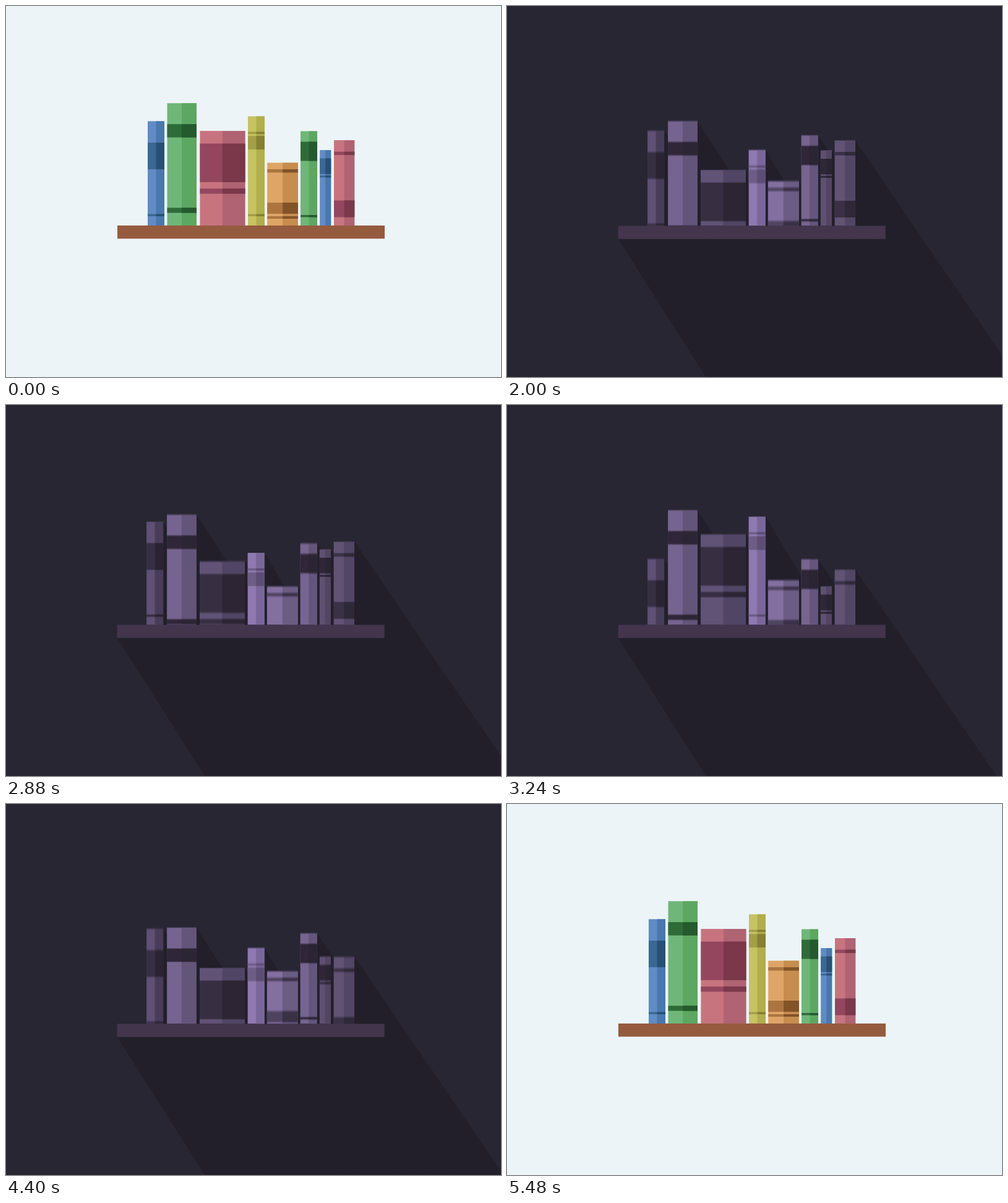
Write an HTML page with a canvas that moves like this. It is 800 px wide and 600 px high and loops after 5760 ms.

```html
<!DOCTYPE html>
<html lang="en">
<head>
<meta charset="utf-8">
<title>Bookshelf</title>
<style>
  html, body { margin: 0; height: 100%; overflow: hidden; background: #ecf4f7; }
  canvas { display: block; }
</style>
</head>
<body>
<canvas id="stage" width="800" height="600"></canvas>
<script>
const LOOP = 5760, DARK_FROM = 880, DARK_TO = 5480, STEP = 40;
const HALF = 400;            // time of one drop or one rise
const SHELF = 355;

const stage = document.getElementById('stage').getContext('2d');
const layer = document.createElement('canvas');
layer.width = 800;
layer.height = 600;
const scene = layer.getContext('2d');

// Colours: left half, right half, band on the left, band on the right
const blue = ['#608bc4', '#4a78ad', '#3a6894', '#275074'];
const green = ['#6fb778', '#5ca761', '#2f6b39', '#245a2e'];
const pink = ['#c8747f', '#b06373', '#94465f', '#7a384a'];
const yellow = ['#c5c362', '#b1ae4c', '#a39f47', '#858032'];
const orange = ['#dea566', '#c68d4e', '#ac7540', '#835328'];

const every800 = start => [0, 1, 2, 3].map(i => start + i * 2 * HALF);

const books = [
  { x: 229, w: 27, top: 186.3, bands: [[221, 264], [336.5, 340]], day: blue,
    night: ['#5f5075', '#483d59', '#362f42', '#2a2432'],
    nudge: -1.5, amp: 69.3, slope: .64, drops: every800(1320) },
  { x: 260.5, w: 47.5, top: 157.2, bands: [[191, 212.5], [326.3, 334.5]], day: green,
    night: ['#74648f', '#63557a', '#2f2738', '#2c2534'],
    amp: 44, slope: .64, drops: [1440, 2266, 3100, 3952] },
  { x: 313.4, w: 73, top: 202, bands: [[222.5, 284.8], [295.2, 303.5]], day: pink,
    night: ['#605376', '#504564', '#372f41', '#2d2533'],
    amp: 64.5, slope: .64, drops: every800(1560) },
  { x: 391, w: 27, top: 178.4, bands: [[203.5, 207], [210.2, 232], [336.5, 340]], day: yellow,
    night: ['#8e79b0', '#7a679a', '#6d5d86', '#5c4e73'],
    amp: 60.2, slope: .6, drops: every800(1680) },
  { x: 422.2, w: 49.8, top: 253.5, bands: [[264, 269.4], [318, 336], [340, 344]], day: orange,
    night: ['#836fa0', '#6b5c84', '#4f4460', '#3a3147'],
    amp: 60, slope: .64, drops: [1803, 2637, 3449, 4262] },
  { x: 476, w: 27, top: 202.5, bands: [[219.5, 250.5], [338, 341.5]], day: green,
    night: ['#76658f', '#63557b', '#2f2738', '#2b2432'],
    amp: 59.3, slope: .66, drops: every800(1920) },
  { x: 507.2, w: 18, top: 233, bands: [[246.5, 271.7], [274.3, 277.3]], day: blue,
    night: ['#5f5072', '#524562', '#2f2738', '#2a2432'],
    amp: 61.5, slope: .66, drops: [2040, 2880, 3720, 4560] },
  { x: 530, w: 33.2, top: 217, bands: [[235.6, 241], [314.5, 341.5]], day: pink,
    night: ['#605374', '#524665', '#3a3146', '#2f2838'],
    amp: 60, slope: .683, drops: [2140, 2950, 3800, 4600] }
];

const ease = u => u * u * (3 - 2 * u);

function sink(book, t) {
  const start = book.drops.findLast(d => d <= t);
  if (start === undefined) return 0;
  return book.amp * ease(Math.max(0, 1 - Math.abs((t - start) / HALF - 1)));
}

function polygon(g, color, ...points) {
  g.fillStyle = color;
  g.beginPath();
  for (const [x, y] of points) g.lineTo(x, y);
  g.fill();
}

function drawBook(g, book, colors, drop) {
  const half = book.w / 2, x = book.x, mid = x + half;
  const stripe = (from, to, left, right) => {
    from += drop;
    to = Math.min(SHELF, to + drop);
    if (to <= from) return;
    g.fillStyle = left;
    g.fillRect(x, from, book.w, to - from);
    g.fillStyle = right;
    g.fillRect(mid, from, half, to - from);
  };
  stripe(book.top, SHELF, colors[0], colors[1]);
  for (const [from, to] of book.bands) stripe(from, to, colors[2], colors[3]);
}

function drawShelf(g, color) {
  g.fillStyle = color;
  g.fillRect(180, SHELF, 432, 21.3);
}

function drawDay() {
  stage.fillStyle = '#ecf4f7';
  stage.fillRect(0, 0, 800, 600);
  for (const book of books) drawBook(stage, book, book.day, 0);
  drawShelf(stage, '#955b3f');
}

function drawNight(t) {
  const g = scene, shade = '#221f2a', far = 500;
  g.fillStyle = '#282632';
  g.fillRect(0, 0, 800, 600);
  g.save();
  g.translate(-.4, .5);
  polygon(g, shade, [180, 376], [612, SHELF],
    [612 + .687 * far, SHELF + far], [180 + .634 * far, 376 + far]);
  for (const book of books) {
    const right = book.x + book.w + (book.nudge || 0);
    const top = book.top + sink(book, t), end = right + book.slope * far;
    polygon(g, shade, [right, top], [end, top + far], [end, SHELF + far], [right, SHELF]);
  }
  for (const book of books) {
    g.save();
    g.translate(book.nudge || 0, 0);
    drawBook(g, book, book.night, sink(book, t));
    g.restore();
  }
  drawShelf(g, '#43354c');
  g.restore();
}

function frame(now) {
  const t = Math.floor(now % LOOP / STEP) * STEP;
  if (t < DARK_FROM || t >= DARK_TO) {
    drawDay();
  } else {
    // Average four moments for a slight motion blur
    [-7.5, -2.5, 2.5, 7.5].forEach((offset, i) => {
      drawNight(t + offset);
      stage.globalAlpha = 1 / (i + 1);
      stage.drawImage(layer, 0, 0);
    });
    stage.globalAlpha = 1;
  }
  requestAnimationFrame(frame);
}
requestAnimationFrame(frame);
</script>
</body>
</html>
```
